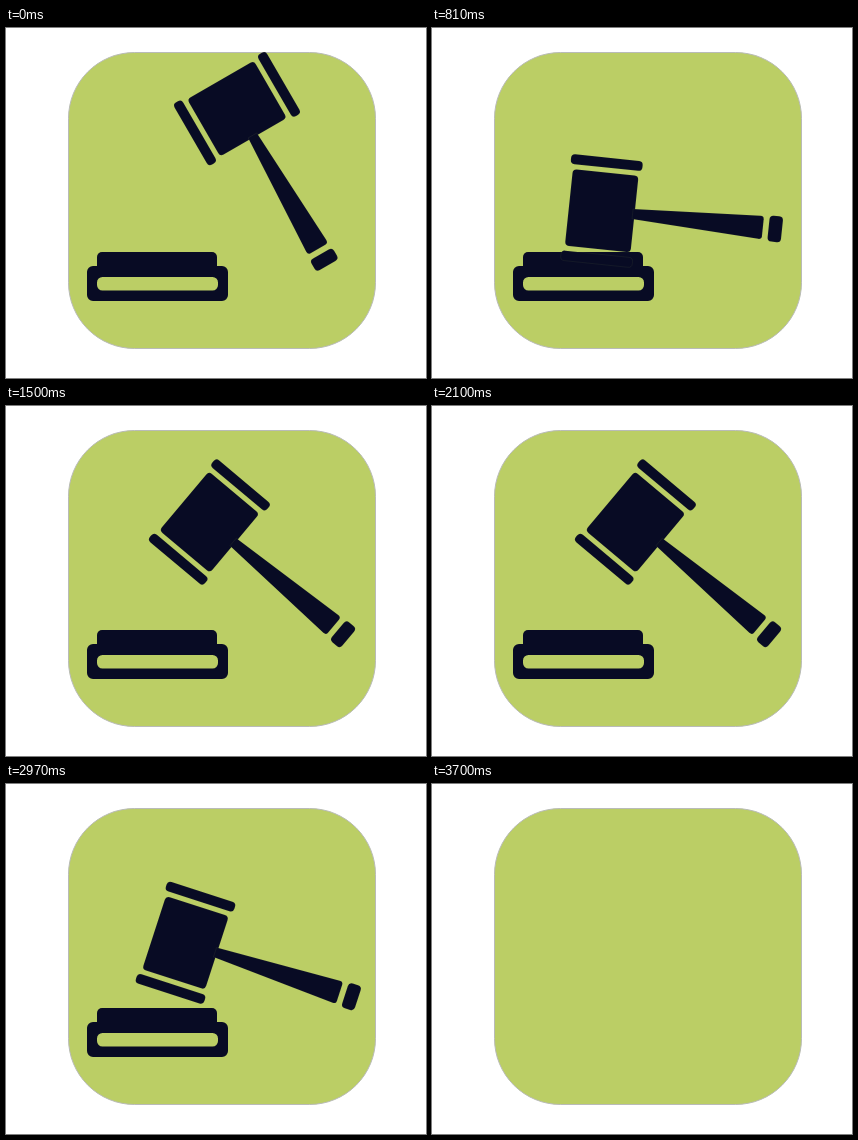
An HTML page that plays this animation: 420 by 350 pixels, repeating every 5.6 s.

```html
<!DOCTYPE html>
<html lang="en">
<head>
<meta charset="utf-8">
<title>Gavel</title>
<style>
  html, body { margin: 0; width: 100%; height: 100%; overflow: hidden; background: #fff; }
  svg { display: block; width: 420px; height: 350px; }
</style>
</head>
<body>
<svg viewBox="0 0 420 350">
  <rect x="62.5" y="24.5" width="307" height="296" rx="66" fill="#bbce65" stroke="#b9bbb8"/>
  <g id="scene" fill="#080b24">
    <rect x="91" y="224" width="120" height="20" rx="5"/>
    <path fill-rule="evenodd" d="M87 238H216a6 6 0 0 1 6 6V267a6 6 0 0 1 -6 6H87a6 6 0 0 1 -6 -6V244a6 6 0 0 1 6 -6Z
      M96.5 249a5.5 5.5 0 0 0 -5.5 5.5V257a5.5 5.5 0 0 0 5.5 5.5H206.500a5.5 5.5 0 0 0 5.5 -5.5V254.500a5.5 5.5 0 0 0 -5.5 -5.5Z"/>
    <g id="gavel" stroke="#bbce65" stroke-opacity=".1" stroke-width=".7">
      <rect x="-36" y="-53.500" width="72" height="10" rx="4"/>
      <rect x="-36" y="43.500" width="72" height="10" rx="4"/>
      <rect x="-33" y="-38.500" width="66" height="77" rx="4"/>
      <path d="M31 -5L158.500 -11.600Q162 -11.700 162 -8.500V8.500Q162 11.700 158.500 11.600L31 5Z"/>
      <rect x="167.750" y="-13" width="13.500" height="26" rx="4"/>
    </g>
  </g>
</svg>
<script>
  const LOOP = 5600, SWING = 900, STEP = 30, LAST = 3600, HIDE = 3700;
  const scene = document.getElementById('scene');
  const gavel = document.getElementById('gavel');

  function draw(time) {
    const t = time % LOOP;
    scene.style.display = t < HIDE ? '' : 'none';
    const tick = Math.min(Math.floor(t / STEP) * STEP, LAST);

    // 0 is raised, 1 is struck; the swing is linear both ways
    const phase = tick % (2 * SWING);
    const k = 1 - Math.abs(1 - phase / SWING);
    const x = 265.3 - 46.6 * k;
    const y = 122 + 63.7 * k;
    const angle = 60 * (1 - k);
    gavel.setAttribute('transform', `translate(${x} ${y}) rotate(${angle}) translate(-53 9)`);
  }

  const start = performance.now();
  function loop() {
    draw(performance.now() - start);
    requestAnimationFrame(loop);
  }
  loop();
</script>
</body>
</html>
```
